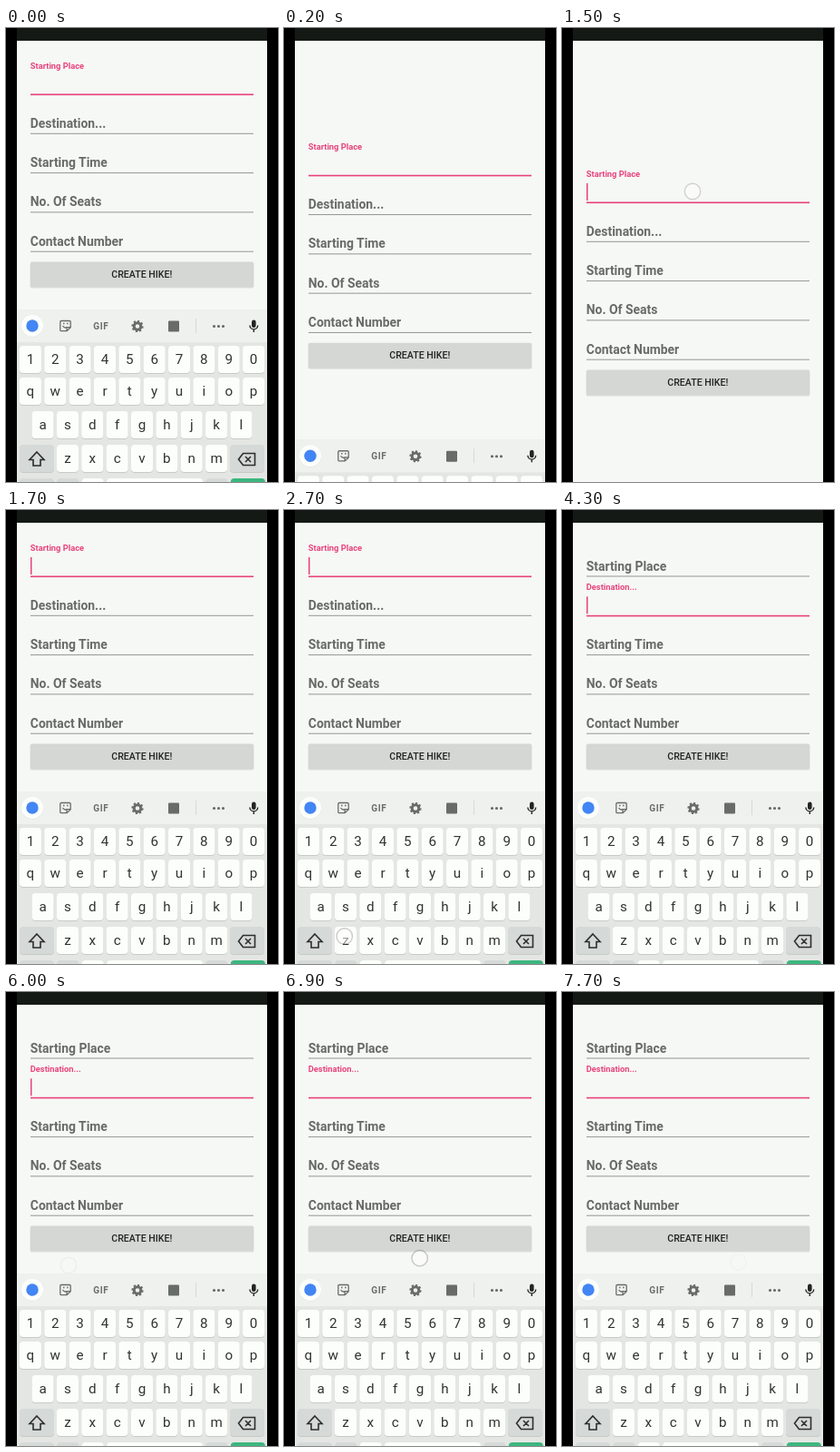
An HTML page that plays this animation: 300 by 500 pixels, repeating every 8000 ms.

```html
<!DOCTYPE html>
<html lang="en">
<head>
<meta charset="utf-8">
<title>Create hike form</title>
<style>
  html, body { margin: 0; width: 100%; height: 100%; overflow: hidden; background: #000; }
  svg { display: block; width: 100vw; height: 100vh; font-family: Roboto, sans-serif; }
  .label { font-weight: 700; font-size: 13.9px; }
  .button { font-weight: 500; font-size: 10.6px; fill: #222421; text-anchor: middle; }
  .key { font-size: 15.2px; fill: #303331; text-anchor: middle; }
  .gif { font-weight: 700; font-size: 10px; letter-spacing: .7px; text-anchor: middle; }
</style>
</head>
<body>
<svg viewBox="0 0 300 500" preserveAspectRatio="none">
  <rect width="300" height="500" fill="#000"/>
  <rect x="12" width="276" height="500" fill="#f6f8f5"/>
  <g id="form">
    <g id="fields"></g>
    <rect id="caret" x="27" width="1.5" height="19" fill="#e8417c"/>
    <rect x="26.5" y="258" width="247" height="28.5" rx="2" fill="#000" opacity=".1"/>
    <rect x="27" y="257.5" width="246" height="28" rx="1.5" fill="#d5d7d4"/>
    <text class="button" x="149.8" y="275.2">CREATE HIKE!</text>
  </g>
  <g id="keyboard">
    <rect x="12" y="310" width="276" height="190" fill="#e4e6e4"/>
    <rect x="12" y="310" width="276" height="36" fill="#eff1ee"/>
    <circle cx="29" cy="328.6" r="12" fill="#000" opacity=".08"/>
    <circle cx="29" cy="328" r="12" fill="#fcfefb"/>
    <circle cx="29" cy="328" r="6.7" fill="#4285f4"/>
    <g fill="none" stroke="#686c69" stroke-width="1.3">
      <path d="M61 322.5h9q1.2 0 1.2 1.2v6l-4 4h-6.2q-1.2 0-1.2-1.2v-8.8q0-1.2 1.2-1.2zM71 329.7h-4v4M62.5 328q2 3 4.5 1.5M63 325.5h1.5M67 325.5h1.5"/>
      <circle cx="145" cy="328.5" r="3.8" stroke-width="3"/>
      <circle cx="145" cy="328.5" r="5.6" stroke-width="2" pathLength="16" stroke-dasharray="1"/>
      <path d="M209.5 320v16" stroke="#d5d8d5" stroke-width="1"/>
      <path d="M229.5 328.5h10.2" stroke-width="3.2" stroke-linecap="round" stroke-dasharray="0 5"/>
    </g>
    <g fill="#686c69">
      <text class="gif" x="104.8" y="331.8">GIF</text>
      <rect x="179" y="322.5" width="12" height="12" rx="1"/>
    </g>
    <rect x="271" y="321.5" width="4.6" height="8.5" rx="2.3" fill="#222522"/>
    <path d="M268.9 327.5a4.4 4.4 0 0 0 8.8 0M273.3 332v3" fill="none" stroke="#222522" stroke-width="1.4"/>
    <g id="keys"></g>
    <g fill="none" stroke="#2b2e2c" stroke-width="1.6">
      <path d="M34 467l8 8.5h-4v6.5h-8v-6.5h-4z"/>
      <path d="M261.5 468.5h13v13h-13l-5-6.5zM264 472l6 6m0-6l-6 6"/>
    </g>
  </g>
  <rect x="12" width="276" height="14" fill="#151915"/>
  <rect x="12" y="14" width="276" height="1" fill="#000" opacity=".08"/>
  <circle id="touch" r="8.7" fill="#fff" fill-opacity=".5" stroke="#000" stroke-opacity=".2" stroke-width="1.4"/>
</svg>
<script>
const LOOP = 8000, STEP = 100, FOCUS_CHANGE = 4000;
const PINK = '#e8417c', GREY = '#686a68', WHITE_KEY = '#fcfefb', DARK_KEY = '#d5d9d7';
const $ = id => document.getElementById(id);

function set(node, attrs) {
  for (const name in attrs) node.setAttribute(name, attrs[name]);
}
function add(parent, tag, attrs, text = '') {
  const node = document.createElementNS('http://www.w3.org/2000/svg', tag);
  set(node, attrs);
  node.textContent = text;
  return parent.appendChild(node);
}

const clamp = p => Math.max(0, Math.min(1, p));
const mix = (a, b, p) => a + (b - a) * p;
const ramp = (t, from, to) => (1 - Math.cos(Math.PI * clamp((t - from) / (to - from)))) / 2;

const fields = ['Starting Place', 'Destination...', 'Starting Time', 'No. Of Seats', 'Contact Number']
  .map((text, i) => ({
    lineY: 73 + i * 43.3,
    label: add($('fields'), 'text', { class: 'label' }, text),
    line: add($('fields'), 'rect', { x: 27, width: 246 })
  }));

const KEY_WIDTH = 24, WIDE_KEY = 38, KEY_HEIGHT = 30, KEY_GAP = 3.35;

function addKey(x, y, width, fill, char = '') {
  const size = { width, height: KEY_HEIGHT, rx: 4 };
  add($('keys'), 'rect', { x, y: y + 1, ...size, fill: '#000', opacity: .12 });
  add($('keys'), 'rect', { x, y, ...size, fill });
  add($('keys'), 'text', { class: 'key', x: x + width / 2, y: y + KEY_HEIGHT / 2 + 5 }, char);
}
function buildKeyboard() {
  const rowY = row => row ? 348 + row * 37 : 350;
  const pitch = KEY_WIDTH + KEY_GAP;
  ['1234567890', 'qwertyuiop', 'asdfghjkl', 'zxcvbnm'].forEach((chars, row) => {
    const left = 150 - (chars.length * pitch - KEY_GAP) / 2;
    [...chars].forEach((char, i) => addKey(left + i * pitch, rowY(row), KEY_WIDTH, WHITE_KEY, char));
  });
  addKey(15, rowY(3), WIDE_KEY, DARK_KEY);
  addKey(247, rowY(3), WIDE_KEY, DARK_KEY);

  let x = 15;
  const addBottomKey = (width, fill) => {
    addKey(x, rowY(4), width, fill);
    x += width + KEY_GAP;
  };
  addBottomKey(WIDE_KEY, DARK_KEY);
  addBottomKey(KEY_WIDTH, DARK_KEY);
  addBottomKey(KEY_WIDTH, WHITE_KEY);
  addBottomKey(4 * pitch - KEY_GAP, WHITE_KEY);
  addBottomKey(KEY_WIDTH, DARK_KEY);
  addBottomKey(WIDE_KEY, '#3db67f');
}
buildKeyboard();

// Paths of the finger: a tap stays put, a sweep swings around a centre.
const tap = (x, y) => () => [x, y];
const sweep = (x, y, width, height, period) => t => {
  const angle = 2 * Math.PI * (t - 6000) / period;
  return [x - width * Math.cos(angle), y - height * Math.sin(angle)];
};
const sweepForm = sweep(135, 301, 66, 8, 700);
const gestures = [
  { start: 1400, end: 1700, path: tap(144, 180) },
  { start: 2200, end: 3050, path: sweep(153, 420, 122, 70, 800) },
  { start: 3100, end: 4000, path: sweepForm },
  { start: 4000, end: 4250, path: tap(150, 105) },
  { start: 4700, end: 6050, path: sweepForm },
  { start: 6200, end: 7730, path: sweepForm }
];

function drawFields(t) {
  const active = t < FOCUS_CHANGE ? 0 : 1;
  const shift = ramp(t, FOCUS_CHANGE - 50, FOCUS_CHANGE + 250);
  fields.forEach(({ lineY, label, line }, i) => {
    const raised = [1 - shift, shift][i] || 0;
    const focused = i === active;
    set(label, {
      transform: `translate(26.8 ${lineY + mix(-6.5, -28.2, raised)}) scale(${mix(1, .67, raised)})`,
      fill: focused ? PINK : GREY
    });
    set(line, { y: lineY - .5, height: focused ? 1.6 : 1, fill: focused ? PINK : '#959795' });
  });
  const sinceBlink = t - (active ? FOCUS_CHANGE : 300);
  const caretOn = sinceBlink >= 0 && sinceBlink % 1000 < 500;
  set($('caret'), { y: fields[active].lineY - 21, opacity: caretOn ? 1 : 0 });
}

function drawTouch(t) {
  const gesture = gestures.find(({ start, end }) => t >= start && t < end);
  if (!gesture) return set($('touch'), { opacity: 0 });
  const [cx, cy] = gesture.path(t);
  set($('touch'), { cx, cy, opacity: clamp((gesture.end - t) / 250) });
}

function render(now) {
  const t = Math.floor(now % LOOP / STEP) * STEP;
  const lowered = ramp(t, 0, 300) - ramp(t, 1500, 1700);
  set($('form'), { transform: `translate(0 ${119 * lowered})` });
  set($('keyboard'), { transform: `translate(0 ${191 * lowered})` });
  drawFields(t);
  drawTouch(t);
}

const start = performance.now();
function frame() {
  render(performance.now() - start);
  requestAnimationFrame(frame);
}
frame();
</script>
</body>
</html>
```
